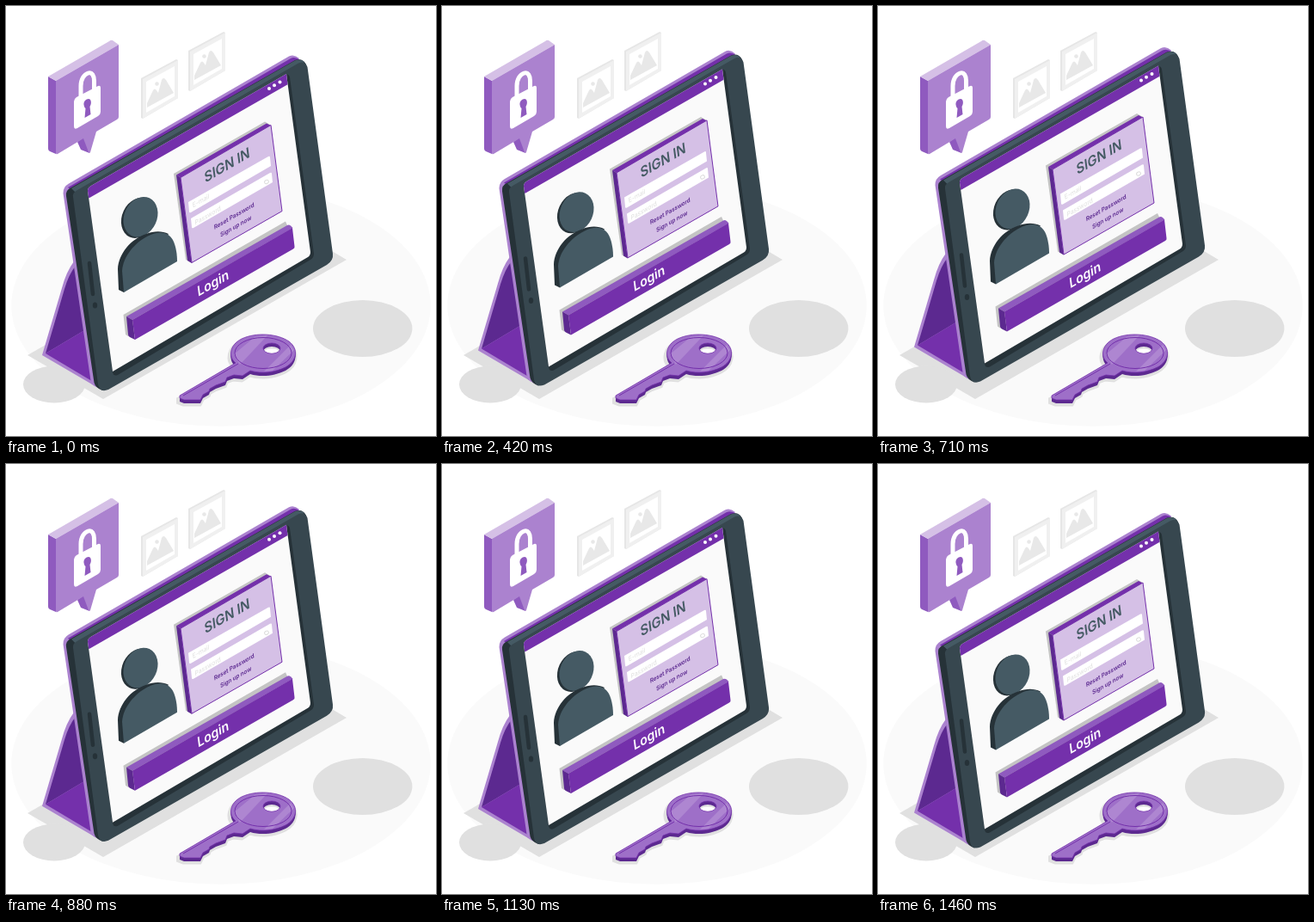
Recreate the animation shown at these times as an HTML page. Size 500 by 500 pixels, loop 1.5 s.

```html
<!DOCTYPE html>
<html lang="en">
<head>
<meta charset="utf-8">
<title>Sign in</title>
<style>
  html, body { margin: 0; width: 100%; height: 100%; overflow: hidden; background: #fff; }
  svg { display: block; width: 100vw; height: 100vh; }
  text { font-family: Inter, sans-serif; font-weight: 600; text-anchor: middle; }
  .deep { fill: #5c2990; }
  .main { fill: #7430ab; }
  .mid { fill: #8f5abf; }
  .soft { fill: #ab82cf; }
  .pale { fill: #d5c0e6; }
  .ink { fill: #263238; }
  .slate { fill: #37474f; }
  .steel { fill: #455a64; }
  .shade { fill: #e0e0e0; }
  .cast { fill: #c4c4c4; }
  .white { fill: #fff; }
  .line { fill: none; stroke: #7430ab; }
  .hint { fill: #dedede; font-weight: 400; font-size: 7.5px; }
  .link { font-size: 7px; }
</style>
</head>
<body>
<svg viewBox="0 0 500 500">
  <defs>
    <g id="picture">
      <path fill="#e6e6e6" d="M157 84 198 62 200 63V107L159 131 157 130Z"/>
      <path fill="#f0f0f0" d="M159 85 200 63V107L159 131Z"/>
      <path fill="#fff" d="M163 88 196 70V105L163 124Z"/>
      <path fill="#e8e8e8" d="M164 118V113L171 98Q173 95 175 98L177 101 181 86Q183 82 186 86L195 101Z"/>
      <circle cx="175.500" cy="90.500" r="2.300" fill="#e8e8e8"/>
    </g>
    <path id="key" fill-rule="evenodd" d="M202 453 267 415C258 408 260 394 274 387C291 379 316 381 329 390C341 399 338 413 325 420C313 426 297 428 284 424L275 430 265 429 257 432 255 437 244 441 237 445 236 448 229 452 226 458H207L202 456ZM299 398a10 6 0 1 0 20 0a10 6 0 1 0-20 0Z"/>
  </defs>

  <ellipse cx="250" cy="348.300" rx="243.700" ry="140.500" fill="#fafafa"/>
  <path class="shade" d="M25 406 113 457 396 295 309 244Z"/>
  <ellipse class="shade" cx="56" cy="440" rx="36" ry="21.500"/>
  <ellipse class="shade" cx="414.700" cy="375" rx="57.700" ry="33"/>

  <use href="#picture"/>
  <use href="#picture" x="55" y="-32"/>

  <!-- lock bubble -->
  <path class="mid" d="M49 82 58 87V172L51 169Q49 168 49 166ZM83 158 87 167 97 171 91 152Z"/>
  <path class="pale" d="M49 82 120 41Q122 39 124 40L131 45 58 87Z"/>
  <path class="soft" d="M58 87 131 45V129Q131 131 129 132L105 146 98 170Q97 172 96 170L90 154 60 172Q58 173 58 171Z"/>
  <path d="M87 106V93C87 85 91 79.500 95.500 78S102.500 81 102.500 87V98" fill="none" stroke="#fff" stroke-width="5"/>
  <path class="white" d="M82 106 107 93Q110 92 110 95V123Q110 126 107 128L83 142Q79 144 79 140V111Q79 108 82 106Z"/>
  <path class="mid" d="M90.500 115C90 111 93 108 96 108S100 113 97.500 117L98.500 126 91.500 130 92.500 119Q91 118 90.500 115Z"/>

  <g id="tablet">
    <!-- folding stand -->
    <path class="soft" d="M42 406 65 328Q70 309 79 297L96 302 107 444Z"/>
    <path class="deep" d="M46 404 68 329Q73 312 81 302L93 376Z"/>
    <path class="main" d="M46 404 93 376 103 438Z"/>

    <!-- cover and body -->
    <path class="soft" d="M103 442 99 439 66.500 218Q66 210.500 73 206.500L329 58.500Q335 55.500 341 61L112 446Z"/>
    <path class="main" d="M72 211 331 61Q336 58.500 342 63L80 217Z"/>
    <path class="ink" d="M112 447Q104 444 102.500 438L70 221Q69 214 76 211L336 63Q345 60 349 68L200 380Z"/>
    <path class="steel" d="M76 212 336 63.500Q342 61 347 65L341 70 82 218Z"/>
    <path class="slate" d="M78 222Q77 217 83 214L340 66.500Q348 63 350.500 71L380 288Q381 296 373 301L119 446Q109 450 107 440Z"/>
    <path class="ink" d="M95 215Q95 211 99 209L324 80Q329 78 330 83L358 288Q358 293 354 295L130 429Q125 431 124 426Z"/>
    <path fill="#fafafa" d="M95 215Q95 211 99 209L326 79 354 286Q354 290 351 292L124 425Z"/>
    <path class="main" d="M96.300 223.500 95 215Q95 211 99 209L326 79 327.500 91.300Z"/>
    <g class="white">
      <circle cx="306" cy="96" r="2"/>
      <circle cx="312" cy="92.300" r="2"/>
      <circle cx="318.500" cy="88.600" r="2"/>
    </g>
    <path d="M97 299 101 335" stroke="#263238" stroke-width="4.500" stroke-linecap="round"/>
    <ellipse class="ink" cx="103.500" cy="348" rx="2.700" ry="3.500"/>

    <!-- avatar -->
    <ellipse class="ink" cx="154" cy="246.300" rx="19" ry="24.500" transform="rotate(25 154 246.300)"/>
    <ellipse class="steel" cx="156.500" cy="245.300" rx="19" ry="24.200" transform="rotate(25 156.500 245.300)"/>
    <path class="ink" d="M137 333 131 330 130 306C131 288 145 271 163 265C172 261.500 181 261 189 265Z"/>
    <path class="steel" d="M137 333 135 308C136 291 150 275 165 267.500C178 261 188 262 194 272C198 280 199 290 199 297Z"/>

    <!-- sign-in card -->
    <path class="cast" d="M195 195 301 134.500 307 138 216 299 209 295Z"/>
    <path class="main" d="M198 196.500 303 136.500 308 139 203 199.500Z"/>
    <path class="deep" d="M198 196.500 203 199.500 216 299 211 296Z"/>
    <path class="pale" d="M203 199.500 308 138.500 321 238.500 216 298.500Z" stroke="#7430ab"/>
    <path class="white" d="M212 228 305 175Q307 174 307 176L308 186 215 240Q213 241 213 239ZM215 247 307 194Q309 193 309 195L310 205 218 258Q216 259 216 257Z"/>
    <ellipse cx="303" cy="204.500" rx="2.500" ry="2" fill="none" stroke="#dedede" transform="rotate(-30 303 204.500)"/>
    <text class="steel" font-size="16.300" transform="matrix(.866 -.5 .13 1 257.800 190.500)">SIGN IN</text>
    <text class="hint" transform="matrix(.866 -.5 .13 1 227 229)">E-mail</text>
    <text class="hint" transform="matrix(.866 -.5 .13 1 235 246)">Password</text>
    <text class="deep link" transform="matrix(.866 -.5 .13 1 265.500 246.500)">Reset Password</text>
    <text class="deep link" transform="matrix(.866 -.5 .13 1 267.500 258.500)">Sign up now</text>

    <!-- login button -->
    <path class="cast" d="M136.500 359 325 250.500 328 257 142 384 139 382Z"/>
    <path class="mid" d="M140 361 327 255Q329 254 331 255.500L333.500 258 147 365Z"/>
    <path class="deep" d="M140 361 147 365 150 388 144 385Q142 384 142 382Z"/>
    <path class="main" d="M147 365 333 258 335.500 279.500Q336 281.500 334 282.500L150 388Z"/>
    <text class="white" font-size="15.700" transform="matrix(.866 -.5 .13 1 241.500 327.500)">Login</text>
  </g>

  <!-- key -->
  <use href="#key" x="-1" y="4.500" class="shade" stroke="#e0e0e0" stroke-width="6"/>
  <use href="#key" y="4" class="deep"/>
  <use href="#key" y="2" class="deep"/>
  <use href="#key" fill="#9e6fc8" stroke="#7430ab" stroke-width=".8"/>
  <path d="M265 405 289 385 304 383 272 417ZM300 425 331 394 335 400 310 424Z" fill="#fff" opacity=".16"/>
  <ellipse class="line" cx="299" cy="403.500" rx="33" ry="18"/>
  <path class="line" d="M206 453 270 416"/>
  <path class="white" d="M301 401a9 4.500 0 0 1 16 0a9 4.500 0 0 1-16 0Z"/>
</svg>
<script>
  const PERIOD = 1500, LIFT = 10;
  const tablet = document.getElementById('tablet');

  function draw(now) {
    const phase = now % PERIOD / PERIOD;
    const y = -LIFT * (1 - Math.abs(1 - 2 * phase));
    tablet.setAttribute('transform', `translate(0 ${y})`);
    requestAnimationFrame(draw);
  }
  draw(0);
</script>
</body>
</html>
```
